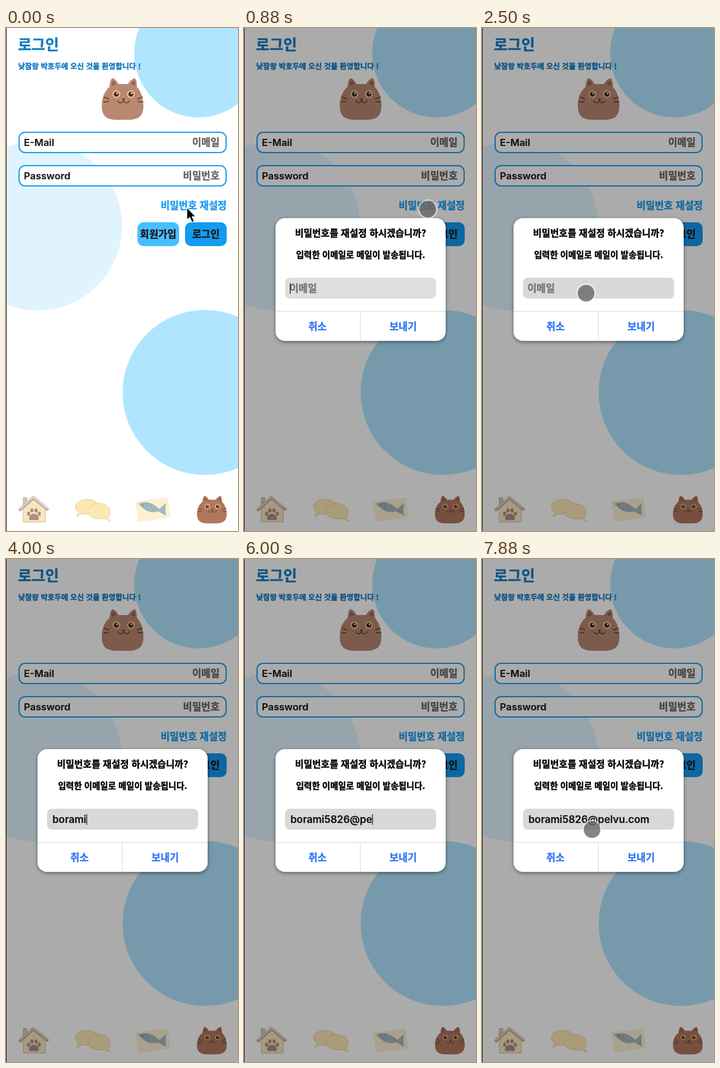
Write an HTML page that moves like this. It is 390 by 844 pixels and loops after 8000 ms.

```html
<!DOCTYPE html>
<html lang="ko">
<head>
<meta charset="utf-8">
<title>로그인</title>
<style>
html, body { margin: 0; width: 100%; height: 100%; overflow: hidden; background: #fff; }
svg { display: block; width: 390px; height: 844px; }
text {
  font-family: "Noto Sans CJK KR", "Noto Sans CJK", sans-serif; font-weight: 700;
  fill: currentColor; stroke: currentColor; stroke-width: .4px;
}
.latin { font-family: Inter, sans-serif; font-weight: 600; stroke-width: .2px; }
.mid { text-anchor: middle; }
.end { text-anchor: end; }
</style>
</head>
<body>
<svg viewBox="0 0 390 844">
  <defs>
    <filter id="shadow" x="-10%" y="-10%" width="120%" height="125%">
      <feDropShadow dx="0" dy="2" stdDeviation="3" flood-opacity=".45"/>
    </filter>
    <g id="cat">
      <path fill="currentColor" d="M13 15Q14 1 18.500 0Q24 2 28 10H44Q49 2 55 0Q59 2 59 15C66 22 70 34 70 47C70 64 61 70 45 70H25C9 70 0 64 0 47C0 34 4 22 13 15Z"/>
      <path fill="#94604f" d="M17 13Q17 6 19 4Q22 6 24 10ZM49 10Q52 6 54.500 4Q56.500 7 56 13Z"/>
      <g fill="#f0c98c"><circle cx="24.500" cy="27" r="6.500"/><circle cx="49" cy="27" r="6.500"/></g>
      <g fill="#4b2b22"><circle cx="24.500" cy="27" r="4.300"/><circle cx="49" cy="27" r="4.300"/></g>
      <g fill="#fff"><circle cx="25.800" cy="25.500" r="1.400"/><circle cx="50.300" cy="25.500" r="1.400"/></g>
      <path fill="#5b3a32" d="M33.500 34.500H39.500L36.500 38Z"/>
      <path fill="none" stroke="#5b3a32" stroke-width="1.400" stroke-linecap="round" d="M36.500 37Q35 42 31 41.500Q28 41 27 38M36.500 37Q38 42 42 41.500Q45 41 46 38M4 32L12 35M3 40L11 39.500M68 32L60 35M69 40L61 39.500"/>
    </g>
  </defs>

  <rect width="390" height="844" fill="#fff"/>
  <circle cx="323.500" cy="42" r="108" fill="#b0e5ff"/>
  <circle cx="53" cy="332" r="142" fill="#e0f4ff"/>
  <circle cx="334.500" cy="611.500" r="138.500" fill="#b0e5ff"/>

  <g color="#127cc4">
    <text x="20" y="36.500" font-size="25">로그인</text>
    <text x="20.500" y="68.500" font-size="12.500">낮잠왕 박호두에 오신 것을 환영합니다 !</text>
  </g>
  <use href="#cat" x="161" y="84" color="#ba8871"/>

  <g fill="#fff" stroke="#1c9deb" stroke-width="2">
    <rect x="22" y="175" width="348" height="34" rx="10"/>
    <rect x="22" y="231" width="348" height="34" rx="10"/>
  </g>
  <g color="#1a1a1a" font-size="16.500">
    <text class="latin" x="30" y="198">E-Mail</text>
    <text class="latin" x="30" y="254">Password</text>
  </g>
  <g class="end" color="#666" font-size="16.700">
    <text x="359" y="198">이메일</text>
    <text x="359" y="254">비밀번호</text>
  </g>
  <text class="end" x="371" y="304" font-size="16.500" color="#1c9df0">비밀번호 재설정</text>
  <rect x="221" y="326" width="70" height="40" rx="10" fill="#47bfff"/>
  <rect x="301" y="326" width="70" height="40" rx="10" fill="#149bf0"/>
  <g class="mid" color="#1a1a1a" font-size="16.700">
    <text x="256" y="352">회원가입</text>
    <text x="336" y="352">로그인</text>
  </g>

  <g stroke-linejoin="round">
    <path d="M29 804L46 789L66 804V829H29Z" fill="#f8e6bd" stroke="#cdb6a7"/>
    <path d="M29 788H35V797L29 802Z" fill="#d9c6b5" stroke="#bda698"/>
    <path d="M24 808L46 788L69 807" fill="none" stroke="#b8a297" stroke-width="5.500" stroke-linecap="round"/>
    <path d="M24 807L46 787L69 806" fill="none" stroke="#e4d3c3" stroke-width="3" stroke-linecap="round"/>
    <g fill="#a98f84">
      <path d="M47 815C53 815 57 821 54.500 825Q51 827 47 825Q43 827 39.500 825C37 821 41 815 47 815Z"/>
      <ellipse cx="38" cy="815" rx="2.600" ry="3.400"/><ellipse cx="43.500" cy="809.500" rx="2.700" ry="3.600"/>
      <ellipse cx="50.500" cy="809.500" rx="2.700" ry="3.600"/><ellipse cx="56" cy="815" rx="2.600" ry="3.400"/>
    </g>
  </g>
  <g fill="#fde8b2" stroke="#dcc59a" stroke-width=".8">
    <path d="M122 812C111 804 118 791 136 791C154 791 161 804 151 811Q142 818 128 815L119 820Z"/>
    <path d="M171 821C180 812 173 798 156 798C139 798 132 812 142 819Q151 826 166 823L176 828Z"/>
  </g>
  <path d="M217 794L272 788L276 821L222 829Z" fill="#fdf0d2"/>
  <path d="M222 798Q238 791 253 803L258 807Q265 800 269 797Q267 807 269 818Q262 815 256 811Q238 817 222 798Z" fill="#a3b7bf"/>
  <path d="M236 797Q235 804 238 810" stroke="#8fa4ad" fill="none"/>
  <circle cx="230" cy="800" r="1.200" fill="#677b84"/>
  <use href="#cat" transform="translate(321 785) scale(.714 .66)" color="#b0765e"/>

  <g id="dialog">
    <rect width="390" height="844" fill="#000" fill-opacity=".33"/>
    <rect x="53" y="319" width="286" height="206" rx="16" fill="#fff" filter="url(#shadow)"/>
    <g class="mid" color="#000">
      <text x="196" y="349.500" font-size="15.800">비밀번호를 재설정 하시겠습니까?</text>
      <text x="196" y="386" font-size="14.500">입력한 이메일로 메일이 발송됩니다.</text>
    </g>
    <rect id="field" x="69" y="419" width="254" height="35" rx="8"/>
    <text id="hint" x="76.500" y="443" font-size="16.700" color="#777">이메일</text>
    <text id="typed" class="latin" x="78" y="443" font-size="17" color="#111"></text>
    <rect id="caret" y="428" width="1.200" height="18" fill="#111"/>
    <path d="M53 475.500H339M195.500 475V525" stroke="#d9d9d9"/>
    <g class="mid" color="#3478f6" font-size="16.700">
      <text x="123.500" y="507">취소</text>
      <text x="267.500" y="507">보내기</text>
    </g>
  </g>

  <path id="arrow" d="M0 0V21L5 17L8.500 25L12.500 23.500L9 15.500H15Z" fill="#000" stroke="#fff" stroke-width="1.200"/>
  <g id="touch">
    <circle r="15" fill="none" stroke="#fff" stroke-opacity=".5" stroke-width="3"/>
    <circle r="14" fill="#666" fill-opacity=".8"/>
  </g>
  <rect width="1" height="844" fill="#1c1c1c"/>
</svg>
<script>
const LOOP = 8000, STEP = 125;
const EMAIL = 'borami5826@pelvu.com';
const OPEN = 875, TYPE_START = 2750, TYPE_END = 7250;
const typing = [[TYPE_START, 0], [4000, 6], [6000, 13], [TYPE_END, EMAIL.length]];
const presses = [[625, 1000], [2375, 2625], [7750, LOOP]];
const linkSpot = [309, 304], fieldSpot = [175, 445], endSpot = [185, 454];

const el = id => document.getElementById(id);
const [dialog, field, hint, typed, caret, arrow, touch] =
  ['dialog', 'field', 'hint', 'typed', 'caret', 'arrow', 'touch'].map(el);
const show = (node, on) => node.setAttribute('visibility', on ? 'visible' : 'hidden');
const progress = (t, a, b) => Math.min(1, Math.max(0, (t - a) / (b - a)));
const ease = p => p * p * (3 - 2 * p);
const mix = (a, b, p) => a.map((v, i) => v + (b[i] - v) * p);
const within = (t, [a, b]) => t >= a && t < b;

function typedCount(t) {
  let count = 0;
  for (let i = 1; i < typing.length; i++) {
    const [t0, n0] = typing[i - 1], [t1, n1] = typing[i];
    count += (n1 - n0) * progress(t, t0, t1);
  }
  return Math.floor(count + 1e-6);
}

function pointerAt(t) {
  return t < 5000
    ? mix(linkSpot, fieldSpot, ease(progress(t, 1000, 2250)))
    : mix(fieldSpot, endSpot, ease(progress(t, 7375, 7750)));
}

function caretOn(t) {
  if (t < TYPE_START) return Math.floor((t - OPEN) / 500) % 2 === 0;
  return t < TYPE_END + 500;
}

function render(time) {
  const t = Math.floor(time / STEP) * STEP;
  const open = t >= OPEN;
  const count = typedCount(t);
  dialog.style.display = open ? '' : 'none';
  if (open) {
    field.setAttribute('fill', t < 1000 ? '#dedede' : '#d8d8d8');
    show(hint, count === 0);
    typed.textContent = EMAIL.slice(0, count);
    caret.setAttribute('x', count ? 78 + typed.getComputedTextLength() : 77);
    show(caret, caretOn(t));
  }
  const [x, y] = pointerAt(t);
  const pressed = presses.some(span => within(t, span));
  const hidden = within(t, [2625, 7500]);
  show(arrow, !pressed && !hidden);
  show(touch, pressed);
  arrow.setAttribute('transform', `translate(${x - 5} ${y - 3})`);
  touch.setAttribute('transform', `translate(${x} ${y})`);
}

const start = performance.now();
function tick() {
  render((performance.now() - start) % LOOP);
  requestAnimationFrame(tick);
}
tick();
</script>
</body>
</html>
```
